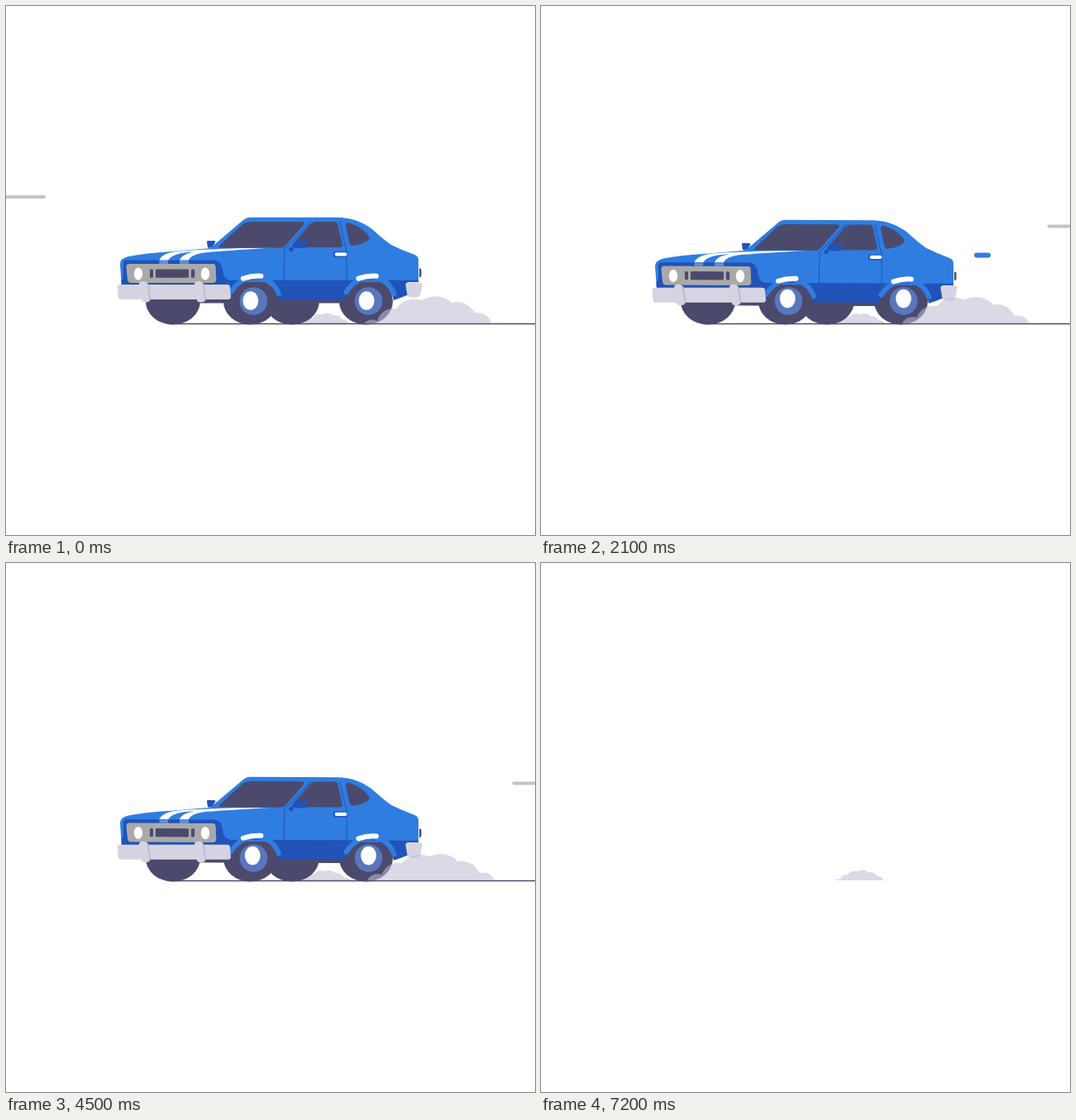
An HTML page that plays this animation: 640 by 640 pixels, repeating every 7300 ms.

```html
<!DOCTYPE html>
<html lang="en">
<head>
<meta charset="utf-8">
<title>Car</title>
<style>
html, body { margin: 0; width: 100%; height: 100%; overflow: hidden; background: #fff; }
svg { display: block; width: 100vw; height: 100vh; }
.light { fill: #2f7de1; }
.dark { fill: #2153b9; }
.navy { fill: #4b4a6d; }
.white { fill: #fff; }
.chrome { fill: #d6d4e2; }
.hub { fill: #5877bd; }
.line { fill: none; stroke-linecap: round; stroke-linejoin: round; }
.seam { stroke: #2153b9; stroke-width: 1; }
.trim { stroke: #2f7de1; stroke-width: 6; }
.shine { stroke: #fff; stroke-width: 6; }
.streak { stroke: #c4c4c4; stroke-width: 4; }
.dash { stroke: #2f7de1; stroke-width: 6; }
.smoke { fill: #bfbdd3; opacity: .56; }
</style>
</head>
<body>
<svg viewBox="0 0 640 640">
  <defs>
    <clipPath id="above"><rect x="300" y="300" width="340" height="84"/></clipPath>
    <path id="shield" d="M258 290L286 264Q290 261 295 261H358Q362 261.500 360 265L338 290Q336 292.500 331 292.500H261Q257 292.500 258 290Z"/>
    <clipPath id="glass"><use href="#shield"/></clipPath>
    <g id="guard">
      <path fill="#b9b7ce" d="M168 334Q172 334 173 338L175 354Q175 358 170 358Z"/>
      <path class="chrome" d="M161 337Q161 333 165 333H167Q170.500 333 171 337L173.500 354Q174 358.500 168.500 358.500Q164 358.500 163.500 354Z"/>
    </g>
    <g id="arch">
      <path class="line trim" d="M272 346Q284 328 303 328Q322 329 330 348"/>
      <path class="line shine" d="M287 329.700Q298 326 308.500 326.700"/>
    </g>
  </defs>

  <g id="back"></g>
  <g clip-path="url(#above)"><g id="puff" class="smoke"></g></g>

  <g id="scene">
    <path d="M198 384.500H640" stroke="#4b4a6d" stroke-width="1.700"/>
    <g class="navy">
      <ellipse cx="202" cy="357" rx="33" ry="28.500"/>
      <ellipse cx="346" cy="357" rx="33" ry="28.500"/>
      <ellipse cx="295.500" cy="357" rx="32.500" ry="28.500"/>
      <ellipse cx="435.500" cy="357" rx="32.500" ry="28.500"/>
    </g>

    <g id="body">
      <path class="navy" d="M228 345H272V359.500H228ZM328 345H408V359.500H328Z"/>
      <path class="light" d="M140 340L138 312Q138 305.500 148 303Q168 299 200 297L247 293L287 259Q291 255.700 296 255.700H400Q424 255.700 443 270Q456 282 466 289Q478 295 492 300Q499 302 499 307V334H280L268 342Z"/>
      <path class="dark" d="M145 307.500H251Q261 308 262 319Q262.500 331 272 331.800H499V334H486V349.500Q478 353 469 356Q464 329 437 329Q418 330 410 350V355.500H330Q325 329 298 329Q283 331 273 347L268 342H140L139.500 332Q142 330 142 326V312Q142 308 145 307.500Z"/>
      <use href="#arch"/>
      <use href="#arch" x="139.500"/>

      <path class="white" d="M185.500 307.500Q189 298 211 296.500Q255 293 320 292.800Q250 295 220 298Q200 300 196.500 307.500ZM210 307.500Q213 298 240 295.700Q270 293.500 320 292.800Q265 296 244 298Q224 300 221 307.500Z"/>
      <path fill="#5b8ee6" d="M185.500 308H196V312H185.500ZM210 308H221V312H210Z"/>

      <use href="#shield" class="navy"/>
      <g clip-path="url(#glass)"><path id="glint" class="white" d="M260 250L284 250L287.500 292.500L266 292.500ZM292 250L298 250L302 292.500L296.500 292.500Z"/></g>
      <path class="navy" d="M347 288L368 264Q371 261 375 261H397Q400.500 261 401.500 264L407 289Q407 292 404 292H348Q345 291.500 347 288Z"/>
      <path class="navy" d="M411 265Q411 261.500 415 262.500Q431 267 439.500 279Q440.500 282 436 285Q429 289 419 290Q416.500 290 415.500 287Z"/>
      <path class="line seam" d="M369 261L337 294.500L336.300 332M404 261L412 297L412.300 332"/>

      <path class="dark" d="M243 285Q243 284 245 284H252Q254 284 253 286L250 291L246 293Q244 293 243.800 291Z"/>
      <path class="dark" d="M351 284H362Q364 284 364 286V291Q364 293 362 293H351Q349 293 347 291Q348 284 351 284Z"/>
      <path class="line" stroke="#2153b9" stroke-width="2" d="M348 291L345 294.500"/>
      <circle class="dark" cx="345" cy="294.500" r="2.700"/>
      <rect class="dark" x="396" y="297" width="16.500" height="7" rx="3"/>
      <rect class="white" x="397.800" y="298.200" width="14.600" height="4.300" rx="2"/>
      <path class="navy" d="M500 317.500Q502.500 317 502.500 319V326Q502 328 500 328.500Z"/>

      <path fill="#aaa9a9" d="M149 312H250Q253.500 312 253.700 316L254.300 331Q254.300 335 250.500 335H151Q147.500 335 147 331L145.500 316Q145.500 312 149 312Z"/>
      <ellipse class="white" cx="160" cy="324" rx="5.200" ry="7.500"/>
      <ellipse class="white" cx="241" cy="324" rx="5.200" ry="7.500"/>
      <g class="navy">
        <rect x="181" y="318.500" width="40" height="10.300" rx="1.500"/>
        <rect x="174" y="318.500" width="4" height="10.300" rx="1.500"/>
        <rect x="224" y="318.500" width="4.200" height="10.300" rx="1.500"/>
      </g>
    </g>

    <g id="bumpers">
      <path class="chrome" d="M138 337H267.500Q271 337 271 340L272 351.500Q272 355 268.500 355H139Q136 355 135.700 352L134.500 340Q134.500 337 138 337Z"/>
      <use href="#guard"/>
      <use href="#guard" x="67"/>
      <path class="chrome" d="M486 334.500H501.500Q504 334.500 503.500 338L501.500 348.500Q500.500 352.500 496.500 352.500H489.500Q486 352.500 485.300 348.500L483.500 338Q483 334.500 486 334.500Z"/>
    </g>

    <circle class="hub" cx="299.500" cy="357" r="16.800"/>
    <circle class="hub" cx="438.700" cy="357" r="16.800"/>
    <g id="caps" class="white">
      <ellipse cx="298.300" cy="356.500" rx="9.400" ry="11.300"/>
      <ellipse cx="438.600" cy="356.500" rx="9.400" ry="11.300"/>
    </g>
    <g clip-path="url(#above)"><g id="cloud" class="smoke"></g></g>
  </g>
</svg>
<script>
const FRAME = 100, FRAMES = 73, BEAT = 12, BASE = 384;
const $ = id => document.getElementById(id);
const mod = (a, n) => ((a % n) + n) % n;

function add(parent, tag, cls) {
  const el = document.createElementNS('http://www.w3.org/2000/svg', tag);
  if (cls) el.setAttribute('class', cls);
  parent.appendChild(el);
  return el;
}

function set(el, attrs) {
  for (const key in attrs) el.setAttribute(key, attrs[key]);
}

const move = (el, x, y) => el.setAttribute('transform', `translate(${x} ${y})`);
const show = (el, on) => el.setAttribute('visibility', on ? 'visible' : 'hidden');

const streaks = [[231, 0], [320, 2], [266.5, 3.28], [358.5, 6]]
  .map(([y, start]) => ({ y, start, el: add($('back'), 'path', 'line streak') }));
const dashes = [[269.5, 9, 0], [301.5, 15, 38]]
  .map(([y, start, x]) => ({ y, start, x, el: add($('back'), 'path', 'line dash') }));
const HEADS = [437, 448, 459, 478, 496, 502, 506];
const TAILS = [392, 402, 412, 436, 460, 474, 486];

const makeCloud = id => Array.from({ length: 8 }, () => add($(id), 'circle'));
const cloud = makeCloud('cloud'), puff = makeCloud('puff');

// Bumps drift right, swelling towards the middle of the heap.
function drawCloud(bumps, f, mid, scale) {
  const gap = 25.5;
  bumps.forEach((el, i) => {
    const u = 424 + mod((f - 5) * gap / 4, gap) + i * gap;
    const v = Math.min(1, Math.abs(u - 515) / 87);
    const h = 33 * Math.pow(Math.cos(v * Math.PI / 2), 1.5);
    const r = h > 0.3 ? 10 + 0.55 * h : 0;
    set(el, { cx: mid + (u - 515) * scale, cy: BASE + (r - h) * scale, r: r * scale });
  });
}

function draw(f) {
  const on = f < FRAMES - 1;
  show($('scene'), on);
  show($('back'), on);
  drawCloud(puff, f, 387, 0.38);
  if (!on) return;
  drawCloud(cloud, f, 515, 1);

  const turn = f * 2 * Math.PI / BEAT;
  const sink = (1 - Math.cos(turn)) / 2;
  $('body').setAttribute('transform', `matrix(1 ${0.009 * sink} 0 1 0 ${3.5 * sink})`);
  move($('bumpers'), 0, 7.3 * sink);
  move($('caps'), -2.4 * Math.cos(turn), 2.4 * Math.sin(turn));

  for (const s of streaks) {
    const n = mod(f - s.start, BEAT);
    const x = -65 + 101 * n + 3.05 * n * n;
    s.el.setAttribute('d', `M${x + 2} ${s.y}h109`);
  }
  for (const d of dashes) {
    const n = mod(f - d.start, 22);
    show(d.el, n < HEADS.length);
    if (n < HEADS.length)
      d.el.setAttribute('d', `M${TAILS[n] + d.x + 3} ${d.y}H${HEADS[n] + d.x - 3}`);
  }

  show($('glint'), f >= 30 && f <= 33);
  move($('glint'), (f - 31) * 38, 0);
}

function tick() {
  draw(Math.floor(performance.now() / FRAME) % FRAMES);
  requestAnimationFrame(tick);
}
tick();
</script>
</body>
</html>
```
